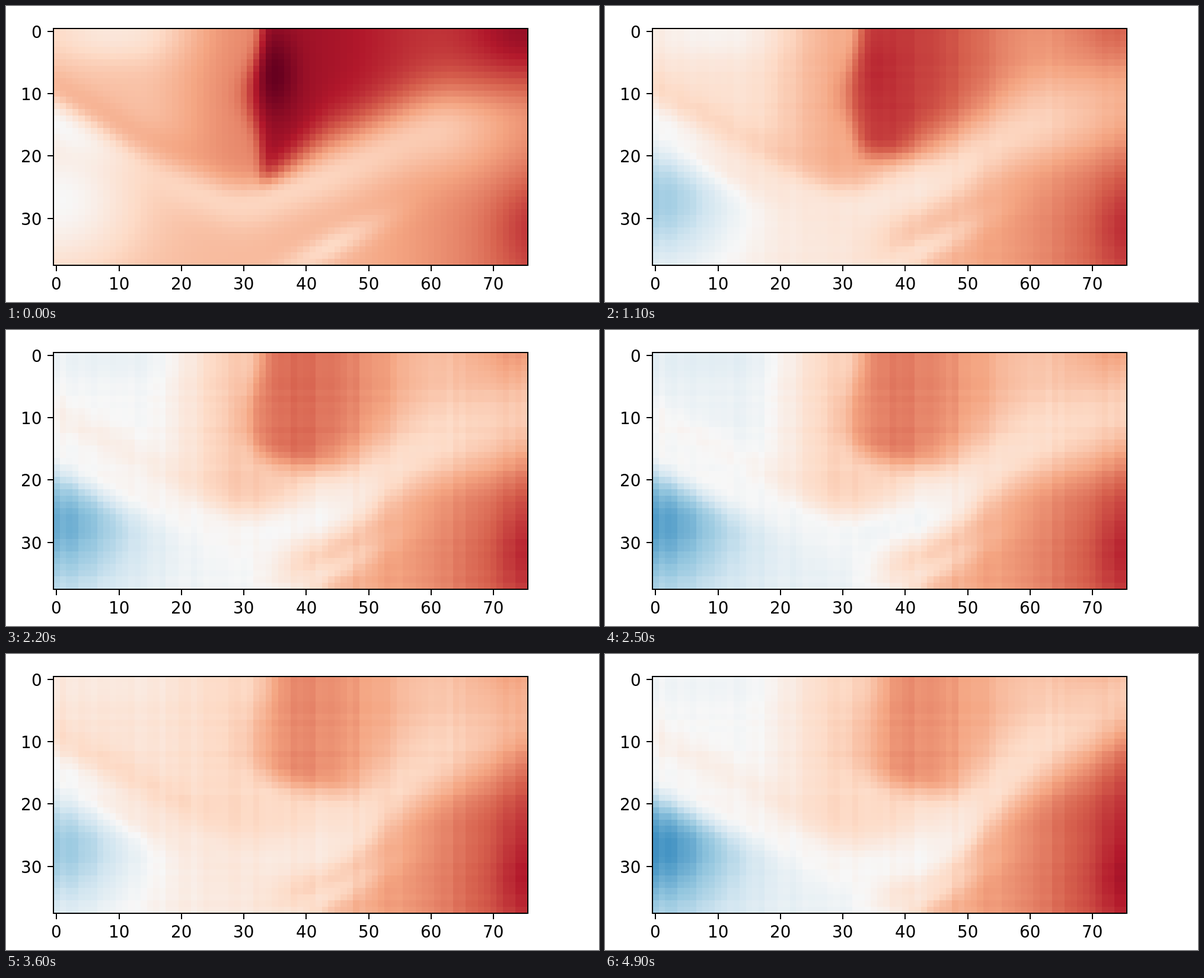
These frames come from a looping animation (1000 px wide and 500 px high, 5 s). An HTML page with a canvas:

```html
<!DOCTYPE html>
<html lang="en">
<head>
<meta charset="utf-8">
<title>Heat map</title>
<style>
  html, body { margin: 0; width: 100%; height: 100%; overflow: hidden; background: #fff; }
  canvas, svg { position: absolute; left: 0; top: 0; width: 1000px; height: 500px; }
  text { font: 27.78px "DejaVu Sans", sans-serif; fill: #000; }
</style>
</head>
<body>
<canvas id="map" width="1000" height="500"></canvas>
<svg id="axes" viewBox="0 0 1000 500"></svg>
<script>
const COLS = 76, ROWS = 38, LEFT = 80, TOP = 37.5, CELL = 800 / COLS;
const LOOP = 5000, BEAT = 100, LAST = 43;
const HOLDS = [13, 14, 15, 16, 37, 47]; // beats on which the map stands still

// Diverging blue-white-red scale, levels 0 to 10; 5 is white.
const SCALE = ['053061', '2166ac', '4393c3', '92c5de', 'd1e5f0', 'f7f7f7',
  'fddbc7', 'f4a582', 'd6604d', 'b2182b', '67001f']
  .map(h => [0, 2, 4].map(i => parseInt(h.slice(i, i + 2), 16)));

const clamp = (v, lo, hi) => Math.max(lo, Math.min(hi, v));
const mix = (a, b, k) => a + (b - a) * k;
const smooth = (a, b, x) => {
  const k = clamp((x - a) / (b - a), 0, 1);
  return k * k * (3 - 2 * k);
};
const bell = z => Math.exp(-z * z);
const spot = (x, y, cx, cy, rx, ry) => bell((x - cx) / rx) * bell((y - cy) / ry);

// Straight lines through [x, y] points.
function along(points, x) {
  let i = 0;
  while (i < points.length - 2 && x > points[i + 1][0]) i++;
  const [a, b] = [points[i], points[i + 1]];
  return mix(a[1], b[1], (x - a[0]) / (b[0] - a[0]));
}

// How far the upper left and the lower left have cooled, by step.
const AIR = [[0, 0], [7, 0], [13, 0.6], [21, 1], [24, 0.45], [32, 0.45], [LAST, 0.85]];
const SEA = [[0, 0], [7, 0.45], [13, 0.74], [21, 1], [24, 0.74], [32, 0.67], [LAST, 1.1]];

// The pale valley sinks in the middle and climbs at the right.
function valleyAt(x, p) {
  const bed = [[0, 15], [15, 23.5 - p], [30, 28.5 + 2 * p],
    [45, 23 + 6.5 * p], [60, 16 - 4 * p], [75, 15 - 12 * p]];
  return (along(bed, x - 3) + along(bed, x) + along(bed, x + 3)) / 3;
}

// Faint vertical and horizontal grain.
let seed = 7;
const random = () => (seed = seed * 16807 % 2147483647) / 2147483647;
const grain = n => Array.from({ length: n }, () => random() - 0.5);
const colGrain = grain(COLS), rowGrain = grain(ROWS);

function fieldAt(step) {
  const p = step / LAST, heat = 1 - smooth(0, 26, step), glow = heat * heat;
  const air = along(AIR, step), sea = along(SEA, step);
  const mid = 6.6 - air - sea;

  // Above the valley: a cool left side and a hot core behind a steep edge.
  function above(x, y, d) {
    const side = mix(6.5 - 1.8 * air, 6 + 1.4 * heat, smooth(13, 30, x))
      - (0.2 + 0.7 * heat) * spot(x, y, 9, 0, 12, 5)
      + 0.4 * bell((d + 5) / 3.5) * (1 - smooth(15, 28, x));
    const core = mix(7.4 + 1.8 * heat, 6.4 + 2.2 * glow, smooth(40, 63, x))
      + 0.9 * glow * spot(x, y, 34.5, 7, 4, 7)
      + 0.8 * spot(x, y, 75, 0, 8, 8);
    const bulge = bell((y - 10) / 6);
    const edge = 32.8 - 1.8 * bulge + 3 * p ** 3;
    const wall = 1 / (1 + Math.exp((edge - x) / (0.5 + 0.6 * bulge + 1.2 * p * p)));
    const floor = 16.5 + 9 * glow + 0.2 * (x - 35);
    return mix(side, core, wall * (1 - smooth(floor - 3, floor + 3, y)));
  }

  // Below the valley: cold at the left, warmer towards the right.
  function below(x, y) {
    const east = Math.max(0, (x - 44) / 31) ** 1.3;
    return mix(mid, 6.7, smooth(28, 46, x))
      + (1.3 + 0.6 * p) * east
      + (5 - 2.7 * sea - mid) * spot(x, y, 0, 27, 13, 12)
      + 0.6 * spot(x, y, 76, 31, 6, 8)
      - 0.7 * bell((y - 36.5 + (x - 40) / 2) / 2.5) * bell((x - 44) / 9);
  }

  function bed(x) {
    const west = mix(5, 6.1 - 1.2 * air, smooth(0, 17, x));
    return mix(west, 6.3 - 0.4 * air, smooth(40, 58, x))
      + (1 - 0.7 * air) * smooth(60, 78, x);
  }

  return (x, y, valley) => {
    const d = y - valley, base = bed(x);
    const reach = d < 0 ? mix(4, 7.5, smooth(33, 45, x)) : mix(4, 9, smooth(40, 75, x));
    const slope = (d < 0 ? above(x, y, d) : below(x, y)) - base;
    return base + slope * (1 - bell(d / reach))
      + 0.2 * smooth(0, 20, step) * (colGrain[x] + rowGrain[y] / 2);
  };
}

function color(level) {
  const v = clamp(level, 0, 9.999), i = Math.floor(v);
  return `rgb(${SCALE[i].map((c, n) => Math.round(mix(c, SCALE[i + 1][n], v - i)))})`;
}

const ctx = document.getElementById('map').getContext('2d');
const edgeX = c => Math.round(LEFT + c * CELL);
const edgeY = r => Math.round(TOP + r * CELL);

function drawMap(step) {
  const level = fieldAt(step);
  for (let c = 0; c < COLS; c++) {
    const valley = valleyAt(c, step / LAST);
    for (let r = 0; r < ROWS; r++) {
      ctx.fillStyle = color(level(c, r, valley));
      ctx.fillRect(edgeX(c), edgeY(r), edgeX(c + 1) - edgeX(c), edgeY(r + 1) - edgeY(r));
    }
  }
}

function drawAxes() {
  const DIGIT = 17.67;
  let ticks = '', labels = '';
  const label = (n, right, y) => {
    const x = Math.round(right - DIGIT * String(n).length);
    labels += `<text x="${x}" y="${Math.round(y)}">${n}</text>`;
  };
  for (let n = 0; n < COLS; n += 10) {
    const x = LEFT + (n + 0.5) * CELL;
    ticks += `M${Math.round(x)} 438v10`;
    label(n, x + DIGIT * String(n).length / 2, 479);
  }
  for (let n = 0; n < ROWS; n += 10) {
    const y = TOP + (n + 0.5) * CELL;
    ticks += `M80 ${Math.round(y)}h-10`;
    label(n, 60.56, y + 11);
  }
  document.getElementById('axes').innerHTML =
    `<path d="M80 38H880V438H80Z${ticks}" fill="none" stroke="#000" stroke-width="2"/>${labels}`;
}

let shown = -1;
function tick(now) {
  const beat = Math.floor((now % LOOP) / BEAT);
  const step = beat - HOLDS.filter(h => h <= beat).length;
  if (step !== shown) drawMap(shown = step);
  requestAnimationFrame(tick);
}

drawAxes();
drawMap(0);
requestAnimationFrame(tick);
</script>
</body>
</html>
```
